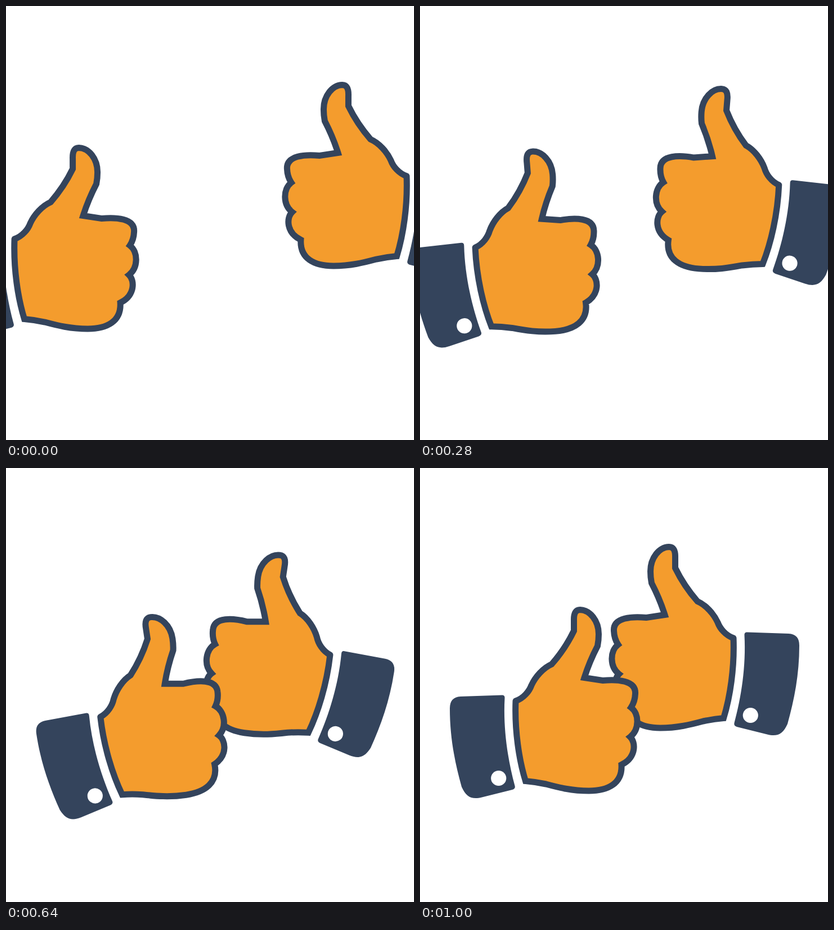
These frames come from a looping animation (725x773 px, 8320 ms). An HTML page without scripts:

```html
<!DOCTYPE html>
<html lang="en">
<head>
<meta charset="utf-8">
<title>Thumbs up</title>
<style>
  html, body { margin: 0; width: 100%; height: 100%; overflow: hidden; background: #fff; }
  svg { display: block; width: 100%; height: 100%; }

  .skin { fill: #f49c2d; stroke: #34445c; stroke-width: 11; stroke-linecap: round; stroke-miterlimit: 10; }
  .cuff { fill: #34445c; }
  .button { fill: #fff; }

  /* --side: 1 enters from the left, -1 from the right */
  .arm {
    transform-box: view-box;
    transform-origin: 362.5px 386.5px;
    animation: slide 8.32s infinite, tilt 8.32s infinite;
  }
  .left { --side: 1; }
  .right { --side: -1; }

  @keyframes slide {
    0% { translate: calc(var(--side) * -155px) 0; animation-timing-function: cubic-bezier(.35, .1, .7, .715); }
    4.327% { translate: calc(var(--side) * -48.7px) 0; animation-timing-function: cubic-bezier(.13, .48, .33, 1); }
    12.019%, 100% { translate: 0 0; }
  }
  @keyframes tilt {
    0% { rotate: 0deg; animation-timing-function: cubic-bezier(.35, .15, .7, .8); }
    6.731% { rotate: calc(var(--side) * -9.9deg); animation-timing-function: cubic-bezier(.5, 0, .6, 1); }
    10.096%, 100% { rotate: 0deg; }
  }
</style>
</head>
<body>
<svg viewBox="0 0 725 773">
  <defs>
    <g id="hand">
      <path class="cuff" d="M72 407L146 404.5Q151 404.5 150.5 410C147.5 465 156 520 168.5 566Q170 571 164 573
        L110 586.5C92 591 82 586 74 568C62 525 53 480 53 428Q53 408 72 407Z"/>
      <circle class="button" cx="139.7" cy="552.5" r="13.6"/>
      <!-- wrist, thumb, four knuckles, palm -->
      <path class="skin" d="M170 415C184 410 194 398 198 387C205 372 219 356 234 349.5
        Q258 322 273.5 290L273.5 272C273 258 277 252.5 284.5 252.5C302 253 317.5 272 317.5 296Q317.5 307 315.5 317
        Q301 345 292 373.5L324.5 378.5
        C350 376 384 378 382.5 402Q382 416 375 426.5
        C390 438 390 466 373.5 479
        C384 489 384 516 358 528.5
        C360 562 334 575 300 575
        C270 575 246 569 224 563Q205 559 187.5 557.5
        C176 520 168 468 170 415"/>
    </g>
  </defs>
  <g class="arm right"><use href="#hand" transform="translate(727 -112) scale(-1 1)"/></g>
  <g class="arm left"><use href="#hand"/></g>
</svg>
</body>
</html>
```
